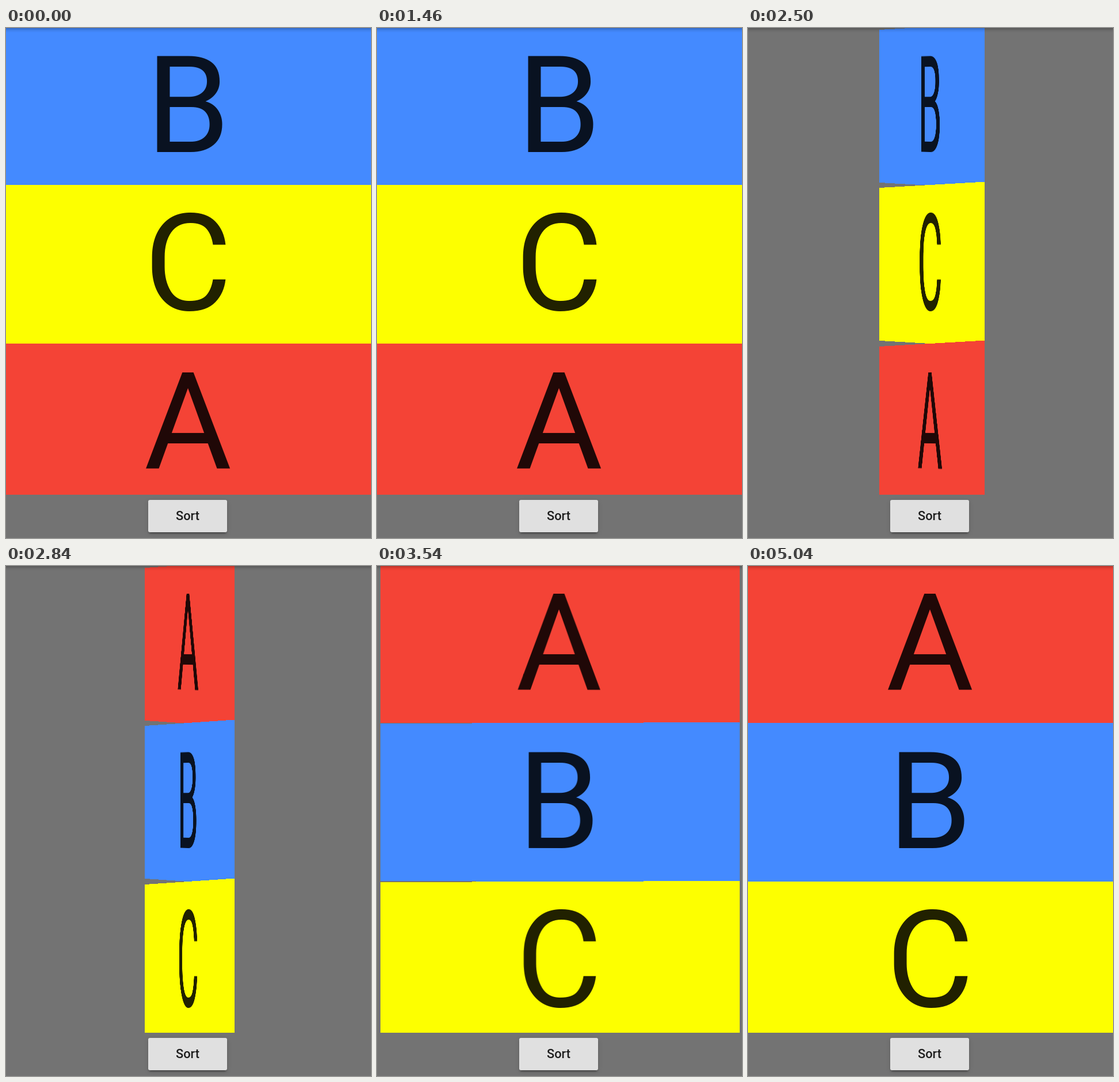
Write an HTML page that moves like this. It is 634 by 884 pixels and loops after 5080 ms.

```html
<!DOCTYPE html>
<html lang="en">
<head>
<meta charset="utf-8">
<title>Sort cards</title>
<style>
  html, body { margin: 0; width: 100%; height: 100%; overflow: hidden; background: #737373; }
  body { position: relative; font-family: Roboto, sans-serif; color: rgba(0, 0, 0, .87); }
  #list { position: absolute; left: 0; top: 0; width: 634px; height: 808.5px; overflow: hidden; }
  .card {
    position: absolute; left: -2px; width: 636px; height: 274.5px;
    font-size: 233.5px; line-height: 274.5px; text-align: center;
  }
  #shade {
    position: absolute; left: 0; top: 0; width: 634px; height: 8px;
    background: linear-gradient(rgba(0, 0, 0, .24), rgba(0, 0, 0, .07) 50%, transparent);
  }
  #sort {
    position: absolute; left: 247px; top: 818px; width: 137px; height: 56px;
    border-radius: 3px; background: #e0e0e0;
    font-size: 21.8px; font-weight: 500; line-height: 56px; text-align: center;
    box-shadow: 0 5px 2px -3px rgba(0, 0, 0, .2), 0 3px 3px rgba(0, 0, 0, .14), 0 2px 8px rgba(0, 0, 0, .12);
  }
</style>
</head>
<body>
<div id="list"></div>
<div id="shade"></div>
<div id="sort">Sort</div>
<script>
  const LOOP = 5080;
  const FLIP_START = 1675, FLIP_MID = 2688, FLIP_END = 3662;
  const COLORS = { A: '#f44336', B: '#448aff', C: '#fdff00' };

  const list = document.getElementById('list');
  const cards = [0, 1, 2].map(i => {
    const card = document.createElement('div');
    card.className = 'card';
    card.style.top = -2.5 + 274.5 * i + 'px';
    return list.appendChild(card);
  });

  const progress = (t, from, to) => Math.min(1, Math.max(0, (t - from) / (to - from)));

  let shown = '';
  function setOrder(order) {
    if (order === shown) return;
    shown = order;
    cards.forEach((card, i) => {
      card.textContent = order[i];
      card.style.background = COLORS[order[i]];
    });
  }

  function draw(t) {
    // Turn edge-on, swap the order, turn back the same way.
    const turn = t < FLIP_MID
      ? progress(t, FLIP_START, FLIP_MID)
      : 1 - progress(t, FLIP_MID, FLIP_END);
    setOrder(t < FLIP_MID ? 'BCA' : 'ABC');
    for (const card of cards) {
      card.style.transform = `perspective(8050px) rotateY(${-90 * turn}deg)`;
    }
  }

  const start = performance.now();
  function tick() {
    draw((performance.now() - start) % LOOP);
    requestAnimationFrame(tick);
  }
  tick();
</script>
</body>
</html>
```
